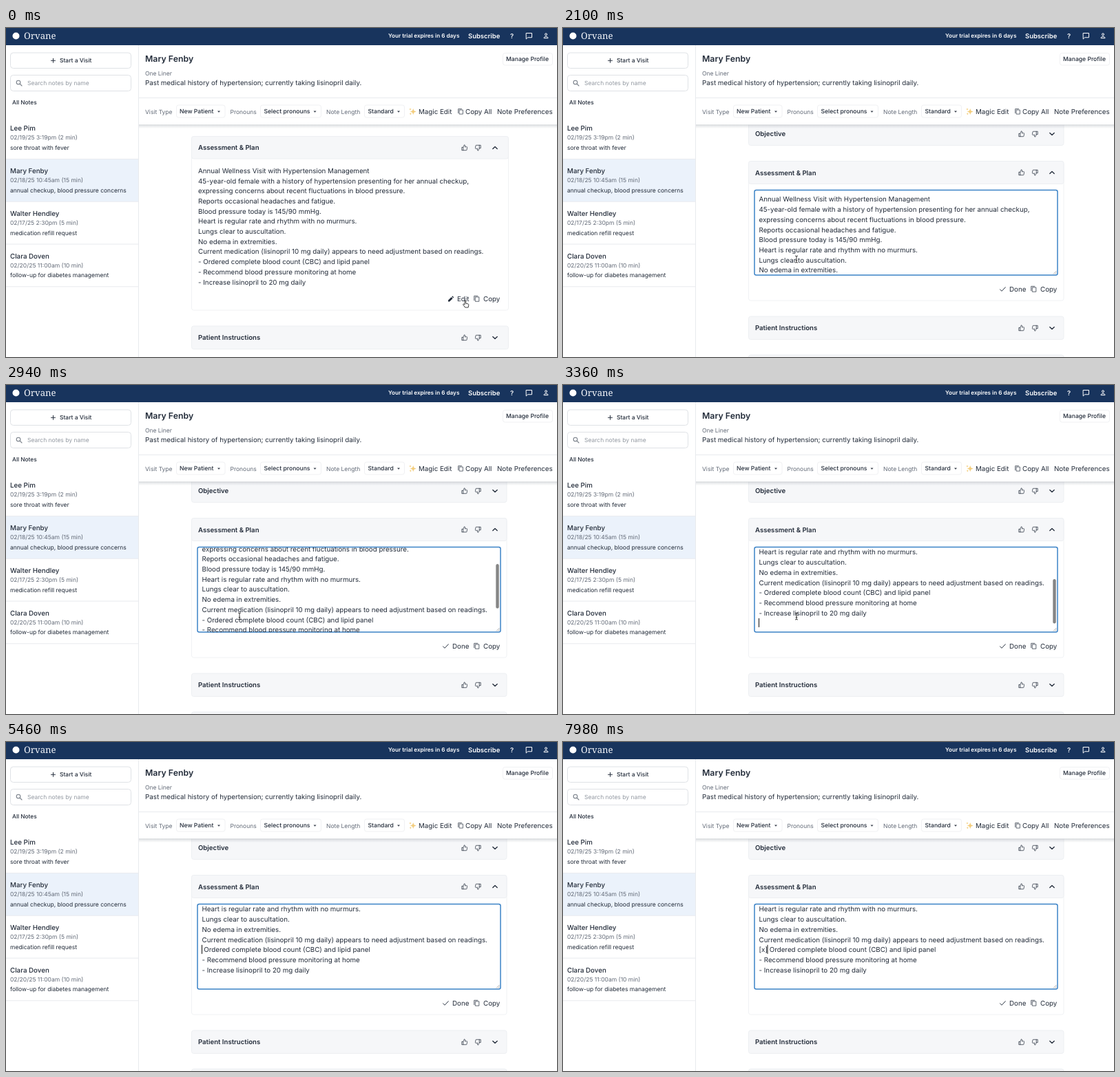
Animation of 800 by 478 pixels, one loop 8000 ms. Source, as an HTML page:

```html
<!DOCTYPE html>
<html lang="en">
<head>
<meta charset="utf-8">
<title>Visit notes</title>
<style>
  html, body { margin: 0; width: 100%; height: 100%; overflow: hidden; background: #fff; }
  svg { display: block; width: 100vw; height: 100vh; }
  text { font: 400 9.78px Inter, sans-serif; fill: #222b39; white-space: pre; text-rendering: geometricPrecision; }
  .small { font-size: 8.5px; }
  .muted { fill: #626a77; }
  .medium { font-weight: 500; }
  .button { font-size: 8.6px; font-weight: 500; }
  .bold { font-size: 9.6px; font-weight: 600; }
  .title { font-size: 12.3px; font-weight: 600; }
  .brand { font: 400 13.2px "Noto Serif", serif; fill: #f4f6fa; }
  .light { font-size: 9.45px; font-weight: 600; fill: #fff; }
  .box { fill: #fff; stroke: #dfe2e6; }
  .faint { fill: #fff; stroke: #f0f1f3; }
  .card { fill: #fff; stroke: #f0f2f4; }
  .bar { fill: #f6f7f9; stroke: #edeff2; }
  .rule { stroke: #e8eaee; }
  .icon { fill: none; stroke: #2a3341; stroke-width: 1.9; stroke-linecap: round; stroke-linejoin: round; }
  .pointer { fill: #fff; stroke: #111; stroke-width: .8; stroke-linejoin: round; }

  .reading, .editing, .scrolled, #thumb, #mouse, #hand, #arrow, #beam { animation: 8s linear infinite; }
  .reading, #hand { animation-name: before-click; }
  .editing { animation-name: after-click; }
  #arrow { animation-name: arrow; }
  #beam { animation-name: beam; }
  #mouse { animation-name: mouse; }
  .scrolled { animation-name: scroll; }
  #thumb { animation-name: thumb; }

  @keyframes before-click { 0%, 5.249% { opacity: 1 } 5.25%, 100% { opacity: 0 } }
  @keyframes after-click { 0%, 5.249% { opacity: 0 } 5.25%, 100% { opacity: 1 } }
  @keyframes arrow { 0%, 5.249% { opacity: 0 } 5.25%, 11.249% { opacity: 1 } 11.25%, 100% { opacity: 0 } }
  @keyframes beam { 0%, 11.249% { opacity: 0 } 11.25%, 67.499% { opacity: 1 } 67.5%, 100% { opacity: 0 } }
  @keyframes mouse {
    0%, 9.625% { transform: translate(667px, 396px); animation-timing-function: ease-in-out }
    14.875% { transform: translate(416px, 270px); animation-timing-function: ease-out }
    18.375%, 43.75% { transform: translate(339px, 336px); animation-timing-function: ease-in-out }
    50.75%, 100% { transform: translate(291px, 302px) }
  }
  @keyframes scroll {
    0%, 31.25% { transform: translateY(0) }
    33.25% { transform: translateY(-17.5px) }
    36.75% { transform: translateY(-40px) }
    41.125%, 100% { transform: translateY(-79.5px) }
  }
  @keyframes thumb {
    0%, 31.249% { transform: translateY(0); opacity: 0 }
    31.25% { transform: translateY(0); opacity: 1 }
    33.25% { transform: translateY(10px) }
    36.75% { transform: translateY(23px) }
    41.125%, 47.5% { transform: translateY(45px); opacity: 1 }
    50.75%, 100% { transform: translateY(45px); opacity: 0 }
  }
</style>
</head>
<body>
<svg viewBox="0 0 800 478" preserveAspectRatio="none">
  <defs>
    <symbol id="thumb-up" viewBox="0 0 24 24" overflow="visible">
      <path class="icon" d="M14 9V5a3 3 0 0 0-3-3l-4 9v11h11.3a2 2 0 0 0 2-1.7l1.4-9a2 2 0 0 0-2-2.3zM7 22H2V11h5"/>
    </symbol>
    <symbol id="copy" viewBox="0 0 24 24" overflow="visible">
      <path class="icon" d="M8 6h13v16H8zM3 18V2h13"/>
    </symbol>
    <g id="votes">
      <use href="#thumb-up" x="661" y="-5" width="9.5" height="9.5"/>
      <use href="#thumb-up" x="-690" y="-5" width="9.5" height="9.5" transform="rotate(180)"/>
    </g>
    <path id="down" class="icon" style="stroke-width:1.4" d="M706.8-1.6 710 1.6 713.2-1.6"/>
    <path id="up" class="icon" style="stroke-width:1.4" d="M706.8 1.6 710-1.6 713.2 1.6"/>
    <path id="caret-down" fill="#333b47" d="M-2-1h4L0 1.2z"/>
    <clipPath id="field"><rect x="279" y="236.2" width="438" height="122"/></clipPath>
    <linearGradient id="shade" x2="0" y2="1">
      <stop stop-color="#8d939b" stop-opacity=".6"/>
      <stop offset=".3" stop-color="#9aa0a8" stop-opacity=".25"/>
      <stop offset="1" stop-color="#9aa0a8" stop-opacity="0"/>
    </linearGradient>
  </defs>

  <rect width="800" height="478" fill="#fff"/>

  <g class="reading">
    <rect class="card" x="269.5" y="157.5" width="460" height="252.5" rx="3"/>
    <rect class="bar" x="269.5" y="157.5" width="460" height="32.5" rx="3"/>
    <text class="bold" x="279" y="177.3">Assessment &amp; Plan</text>
    <use href="#votes" y="174"/><use href="#up" y="174"/>
    <g id="note"></g>
    <path fill="#222b39" d="M642 397.5v-2l4.6-4.6 2 2-4.6 4.6zM647.2 390.3l1-1 2 2-1 1z"/>
    <text x="655" y="396.8">Edit</text>
    <use href="#copy" x="678.5" y="388.5" width="9.5" height="9.5"/>
    <text x="693" y="396.8">Copy</text>
    <rect class="bar" x="269.5" y="433" width="460" height="33.5" rx="3"/>
    <text class="bold" x="279" y="453.2">Patient Instructions</text>
    <use href="#votes" y="450"/><use href="#down" y="450"/>
  </g>

  <g class="editing">
    <rect class="bar" x="269.5" y="137" width="457.5" height="33.5" rx="3"/>
    <text class="bold" x="279" y="157.3">Objective</text>
    <use href="#votes" y="154"/><use href="#down" y="154"/>

    <rect class="card" x="269.5" y="193.5" width="457.5" height="202.5" rx="3"/>
    <rect class="bar" x="269.5" y="193.5" width="457.5" height="33" rx="3"/>
    <text class="bold" x="279" y="213.5">Assessment &amp; Plan</text>
    <use href="#votes" y="210"/><use href="#up" y="210"/>

    <rect x="278" y="235.5" width="440" height="123.5" rx="2.5" fill="#fff" stroke="#3b82c6" stroke-width="1.5"/>
    <g clip-path="url(#field)">
      <g id="draft" class="scrolled">
        <rect id="caret" width="1" height="13" fill="#111"/>
      </g>
    </g>
    <rect id="thumb" x="711.3" y="237" width="4.4" height="64.5" rx="2.2" fill="#858585"/>
    <path d="M712 357.5l4.5-4.5M714.5 357.5l2-2" stroke="#888" stroke-width=".7"/>

    <path class="icon" style="stroke-width:1" d="M634.5 379.8l2.5 2.5 5.3-5.6"/>
    <text x="648" y="382.8">Done</text>
    <use href="#copy" x="678.5" y="374.5" width="9.5" height="9.5"/>
    <text x="693" y="382.8">Copy</text>

    <rect class="bar" x="269.5" y="419" width="457.5" height="33.5" rx="3"/>
    <text class="bold" x="279" y="439.2">Patient Instructions</text>
    <use href="#votes" y="436"/><use href="#down" y="436"/>
    <rect class="bar" x="269.5" y="475" width="457.5" height="33" rx="3"/>
  </g>

  <!-- visit header and toolbar -->
  <rect x="193" y="140" width="607" height="6" fill="url(#shade)"/>
  <rect x="193" y="25" width="607" height="115.5" fill="#fff"/>
  <path class="rule" d="M193 101.5h607"/>
  <text class="title" x="202" y="48.5">Mary Fenby</text>
  <text class="small muted" x="202" y="68.5">One Liner</text>
  <text x="202" y="82.6">Past medical history of hypertension; currently taking lisinopril daily.</text>
  <rect class="faint" x="721.5" y="36.5" width="72" height="17.5" rx="3"/>
  <text class="button" x="726" y="48.2">Manage Profile</text>

  <text class="small muted" x="202" y="124.5">Visit Type</text>
  <rect class="faint" x="247.5" y="112" width="70.5" height="18" rx="3"/>
  <text class="button" x="252" y="124.4">New Patient</text>
  <use href="#caret-down" x="309" y="121.5"/>
  <text class="small muted" x="325.5" y="124.5">Pronouns</text>
  <rect class="faint" x="369.5" y="112" width="88" height="18" rx="3"/>
  <text class="button" x="374.5" y="124.4">Select pronouns</text>
  <use href="#caret-down" x="448.5" y="121.5"/>
  <text class="small muted" x="465" y="124.5">Note Length</text>
  <rect class="faint" x="520.5" y="112" width="58" height="18" rx="3"/>
  <text class="button" x="525.5" y="124.4">Standard</text>
  <use href="#caret-down" x="570" y="121.5"/>
  <path fill="#f3cd7c" d="M591.2 117l1.2 3.3 3.3 1.2-3.3 1.2-1.2 3.3-1.2-3.3-3.3-1.2 3.3-1.2zM587 116.2l.5 1.3 1.3.5-1.3.5-.5 1.3-.5-1.3-1.3-.5 1.3-.5zM587.3 123l.5 1.2 1.2.5-1.2.5-.5 1.2-.5-1.2-1.2-.5 1.2-.5z"/>
  <text x="599" y="124.9">Magic Edit</text>
  <use href="#copy" x="655.5" y="116.8" width="9" height="9"/>
  <text x="667" y="124.9">Copy All</text>
  <text x="713" y="124.9">Note Preferences</text>

  <!-- sidebar -->
  <rect y="25" width="192" height="453" fill="#fff"/>
  <rect class="box" x="6.5" y="36" width="175" height="22.5" rx="4"/>
  <path class="icon" style="stroke-width:1" d="M65.5 47.3h6M68.5 44.3v6"/>
  <text class="medium" style="font-size:8.45px" x="78" y="50.3">Start a Visit</text>
  <rect class="box" x="6.5" y="68.5" width="175" height="23" rx="4"/>
  <path class="icon" style="stroke:#777e88;stroke-width:1.1" d="M20.8 79a2.8 2.8 0 1 1-5.6 0a2.8 2.8 0 0 1 5.6 0M20.2 81.2l2.8 2.8"/>
  <text class="small" style="fill:#9298a1" x="31" y="83.2">Search notes by name</text>
  <text class="medium" style="font-size:8.3px" x="9" y="110.7">All Notes</text>
  <rect y="190.5" width="192" height="61.5" fill="#ebf2fb"/>
  <g id="visits"></g>
  <path class="rule" d="M192.5 25v453"/>

  <!-- app bar -->
  <rect width="800" height="25" fill="#18345d"/>
  <circle cx="14.5" cy="11.5" r="5" fill="#fff"/>
  <text class="brand" x="26" y="16.3">Orvane</text>
  <text class="light" style="font-size:8.15px" x="555" y="14.2">Your trial expires in 6 days</text>
  <text class="light" x="671" y="14.9">Subscribe</text>
  <text class="light" x="732" y="15">?</text>
  <path class="icon" style="stroke:#fff;stroke-width:1" d="M755.5 7.5h8v6.3h-6l-2 2z"/>
  <path class="icon" style="stroke:#fff;stroke-width:1" d="M785.5 9.3a1.5 1.5 0 1 1-3 0a1.5 1.5 0 0 1 3 0M781 14.3c0-2.7 6-2.7 6 0z"/>

  <g id="mouse">
    <path id="hand" class="pointer" d="M-1 .8c0-1.2 1.7-1.2 1.7 0v3.4l3 .6q1.3.4 1.1 1.7l-.7 3.5h-4.5l-2.8-3.8c-.6-1 .6-1.7 1.3-1l.9.9z"/>
    <path id="arrow" class="pointer" style="fill:#111;stroke:#fff" d="M0 0v10l2.3-2.2 1.5 3.5 1.5-.7-1.5-3.3h3.2z"/>
    <path id="beam" fill="none" stroke="#222" stroke-width=".9" d="M-2-5q2 0 2 1.2q0-1.2 2-1.2M0-4v8M-2 5q2 0 2-1.2q0 1.2 2 1.2M-1.2 1.5h2.4"/>
  </g>
</svg>
<script>
  const LOOP = 8000, LINE = 14.7, LEFT = 284.5, TOP = 252.4;
  const ORDER_ROW = 9, LAST_ROW = 12;

  const note = [
    "Annual Wellness Visit with Hypertension Management",
    "45-year-old female with a history of hypertension presenting for her annual checkup,",
    "expressing concerns about recent fluctuations in blood pressure.",
    "Reports occasional headaches and fatigue.",
    "Blood pressure today is 145/90 mmHg.",
    "Heart is regular rate and rhythm with no murmurs.",
    "Lungs clear to auscultation.",
    "No edema in extremities.",
    "Current medication (lisinopril 10 mg daily) appears to need adjustment based on readings.",
    "- Ordered complete blood count (CBC) and lipid panel",
    "- Recommend blood pressure monitoring at home",
    "- Increase lisinopril to 20 mg daily"
  ];
  const visits = [
    ["Lee Pim", "02/19/25 3:19pm (2 min)", "sore throat with fever"],
    ["Mary Fenby", "02/18/25 10:45am (15 min)", "annual checkup, blood pressure concerns"],
    ["Walter Hendley", "02/17/25 2:30pm (5 min)", "medication refill request"],
    ["Clara Doven", "02/20/25 11:00am (10 min)", "follow-up for diabetes management"]
  ];
  // When each action happens and what then stands before the caret
  const edits = [
    { at: 0, row: LAST_ROW, prefix: "-" },
    { at: 4300, row: ORDER_ROW, prefix: "-" },
    { at: 5390, row: ORDER_ROW, prefix: "" },
    { at: 6020, row: ORDER_ROW, prefix: "[" },
    { at: 6860, row: ORDER_ROW, prefix: "[x" },
    { at: 7560, row: ORDER_ROW, prefix: "[x]" }
  ];

  const byId = id => document.getElementById(id);

  function add(parent, tag, attrs = {}, content = "") {
    const node = document.createElementNS("http://www.w3.org/2000/svg", tag);
    for (const key in attrs) node.setAttribute(key, attrs[key]);
    node.textContent = content;
    return parent.appendChild(node);
  }

  visits.forEach(([name, date, reason], i) => {
    const y = 149.4 + i * 61.8, list = byId("visits");
    add(list, "text", { x: 6, y, class: "medium" }, name);
    add(list, "text", { x: 6, y: y + 12.8, class: "small muted" }, date);
    add(list, "text", { x: 6, y: y + 27.5, class: "small" }, reason);
    add(list, "path", { d: `M0 ${y + 41}h192`, class: "rule" });
  });

  note.forEach((line, i) => add(byId("note"), "text", { x: 279, y: 210.8 + i * LINE }, line));
  const rows = note.map((line, i) => add(byId("draft"), "text", { x: LEFT, y: TOP + i * LINE }, line));
  const orderRow = rows[ORDER_ROW];
  orderRow.textContent = "";
  const prefix = add(orderRow, "tspan");
  add(orderRow, "tspan", {}, note[ORDER_ROW].slice(1));

  const caret = byId("caret");

  function draw(now) {
    const time = now % LOOP;
    const edit = edits.findLast(e => e.at <= time);
    if (prefix.textContent !== edit.prefix) prefix.textContent = edit.prefix;
    const offset = edit.row === ORDER_ROW && edit.prefix ? prefix.getComputedTextLength() : 0;
    caret.setAttribute("x", LEFT - .5 + offset);
    caret.setAttribute("y", TOP + edit.row * LINE - 10.4);
    caret.setAttribute("opacity", (time - edit.at) % 1000 < 500 ? 1 : 0);
    requestAnimationFrame(draw);
  }
  draw(performance.now());
</script>
</body>
</html>
```
